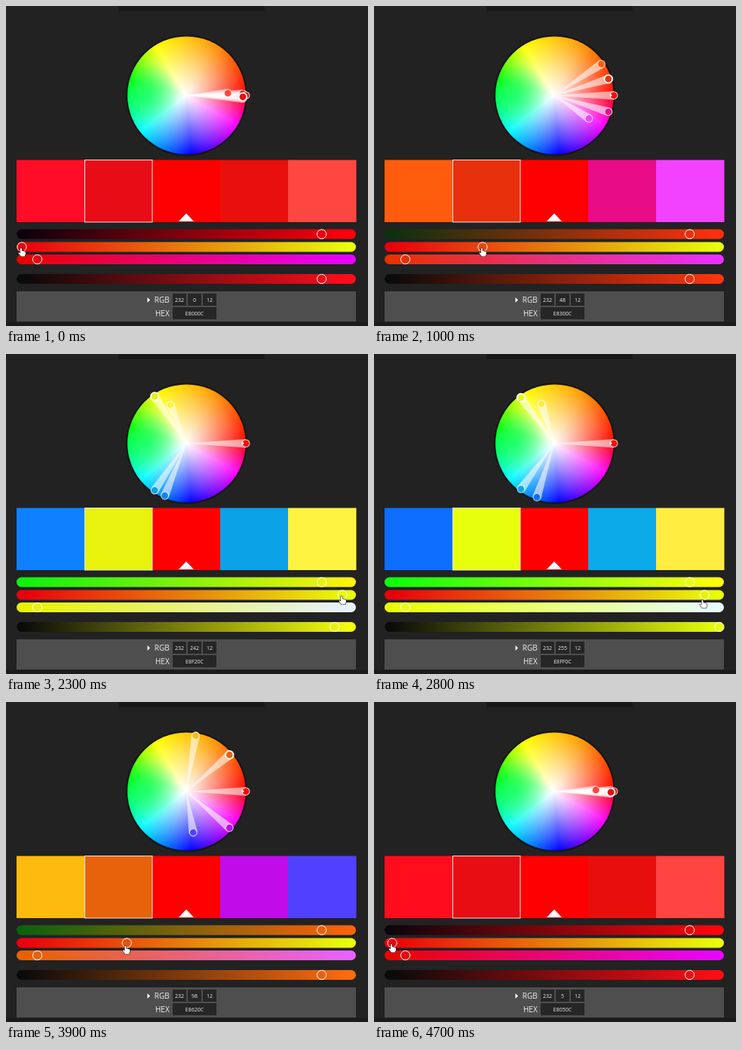
Recreate the animation shown at these times as an HTML page with a canvas. Size 480x425 px, loop 4800 ms.

```html
<!DOCTYPE html>
<html>
<head>
<meta charset="utf-8">
<style>
html, body { margin: 0; width: 100%; height: 100%; overflow: hidden; background: #222; }
canvas { display: block; }
</style>
</head>
<body>
<canvas id="stage" width="480" height="425"></canvas>
<script>
const ctx = document.getElementById('stage').getContext('2d');
const LOOP = 4800, STEP = 100;
const CX = 239, CY = 118.7, R = 79;

const clamp = x => Math.max(0, Math.min(1, x));
const mod = a => (a % 360 + 360) % 360;

// Both sweep 0..1 and back; the knob runs ahead of the shown value.
const ramp = (elapsed, span, power) => clamp(elapsed / span) ** power;
const valueAt = t => Math.min(ramp(t - 110, 2254.7, 1.796), ramp(4819 - t, 1775, 1.455));
const knobAt = t => Math.min(ramp(t - 540, 1814, .924), ramp(4748 - t, 2017, 1.32));

// hue in degrees, angle on the artist's wheel
const WHEEL = [[0, 0], [35, 60], [60, 122], [120, 165], [180, 218], [240, 275], [300, 330], [360, 360]];

function lookup(x, from, to) {
  const i = Math.max(1, WHEEL.findIndex(p => p[from] >= x));
  const a = WHEEL[i - 1], b = WHEEL[i];
  return a[to] + (b[to] - a[to]) * (x - a[from]) / (b[from] - a[from]);
}
const hueToAngle = h => lookup(mod(h), 0, 1);
const angleToHue = a => lookup(mod(a), 1, 0);
const rgb = (...c) => `rgb(${c.map(Math.round).join()})`;

function hsv(h, s, v) {
  const channel = n => {
    const k = (n + h / 60) % 6;
    return 255 * v * (1 - s * clamp(Math.min(k, 4 - k)));
  };
  return rgb(channel(5), channel(3), channel(1));
}

function rgbToHue(r, g, b) {
  if (g < b) return 60 * (g - b) / (r - g);
  return r >= g ? 60 * (g - b) / (r - b) : 120 + 60 * (b - r) / (g - b);
}

function rect(x, y, w, h, color) {
  ctx.fillStyle = color;
  ctx.fillRect(x, y, w, h);
}

function poly(points, color) {
  ctx.beginPath();
  points.forEach(p => ctx.lineTo(...p));
  ctx.closePath();
  ctx.fillStyle = color;
  ctx.fill();
}

function circle(x, y, r, fill, stroke, width) {
  ctx.beginPath();
  ctx.arc(x, y, r, 0, 7);
  if (fill) { ctx.fillStyle = fill; ctx.fill(); }
  if (stroke) { ctx.strokeStyle = stroke; ctx.lineWidth = width; ctx.stroke(); }
}

function text(str, x, y, size, align = 'center') {
  ctx.font = `${size}px "Open Sans", "Noto Sans", sans-serif`;
  ctx.textAlign = align;
  ctx.fillStyle = '#eee';
  ctx.fillText(str, x, y);
}

function radial(x, y, r, inner, outer) {
  const g = ctx.createRadialGradient(x, y, 0, x, y, r);
  g.addColorStop(0, inner);
  g.addColorStop(1, outer);
  return g;
}

const disc = ctx.createConicGradient(0, CX, CY);
WHEEL.forEach(([h, a]) => disc.addColorStop(1 - a / 360, hsv(h % 360, 1, 1)));
const glow = radial(CX, CY, R, '#fff', 'rgba(255,255,255,0)');
const greenSide = radial(CX - 52, CY, 42, 'rgba(0,255,90,.65)', 'rgba(0,255,90,0)');

function drawWheel(markers) {
  circle(CX + .4, CY, R + 1.5, '#151515');
  for (const layer of [disc, glow, greenSide]) circle(CX + .4, CY, R - .7, layer);
  for (const m of markers) {
    const t = m.angle * Math.PI / 180;
    m.x = CX + Math.cos(t) * m.radius * R;
    m.y = CY - Math.sin(t) * m.radius * R;
    const dx = 5.8 * Math.sin(t), dy = 5.8 * Math.cos(t);
    poly([[CX, CY], [m.x + dx, m.y + dy], [m.x - dx, m.y - dy]], 'rgba(255,255,255,.58)');
  }
  // the selected marker goes on top
  for (const i of [4, 3, 0, 2, 1]) {
    const m = markers[i];
    if (i === 1) circle(m.x, m.y, 5.3, m.color, '#fff', 1.8);
    else circle(m.x, m.y, 4.9, m.color, 'rgba(255,255,255,.7)', 1.2);
    if (i === 2) poly([[m.x - 5, m.y - 2.5], [m.x - 2, m.y], [m.x - 5, m.y + 2.5]], '#fff');
  }
}

function drawSwatches(markers) {
  markers.forEach((m, i) => rect(14 + 90 * i, 204.5, 90.5, 82.5, m.color));
  ctx.strokeStyle = '#e4e4e4';
  ctx.lineWidth = 1;
  ctx.strokeRect(104.5, 204.5, 89.5, 82.5);
  poly([[229, 286], [239, 275.5], [249, 286]], '#fff');
}

function slider(y, from, to, knob) {
  const fill = ctx.createLinearGradient(21, 0, 458, 0);
  fill.addColorStop(0, from);
  fill.addColorStop(1, to);
  ctx.beginPath();
  ctx.roundRect(14, y - 6.5, 450, 13, 6.5);
  ctx.fillStyle = fill;
  ctx.fill();
  circle(knob, y, 6.1, null, '#fff', 1);
}

function drawPanel(r, g, b) {
  rect(14, 379, 450, 40, '#4e4e4e');
  rect(0, 420, 480, 5, '#1b1b1b');
  poly([[187.5, 387], [191, 390.5], [187.5, 394]], '#fff');
  text('RGB', 216.7, 394, 10, 'right');
  text('HEX', 216.7, 412, 10, 'right');
  [r, g, b].forEach((v, i) => {
    rect(221 + 20 * i, 382, 18, 16, '#262626');
    text(v, 230 + 20 * i, 393, 7);
  });
  rect(221, 400, 58, 16, '#262626');
  const hex = [r, g, b].map(v => v.toString(16).padStart(2, '0')).join('').toUpperCase();
  text(hex, 250, 411, 7);
}

const HAND = new Path2D('M-1 .5Q0-.6 1 .5V4.2Q2.2 3.4 3 4.6Q4.2 4 4.8 5.2Q6.4 4.8 6.4 6.5V8.5L5.2 12H-.2L-3.6 7.6Q-3.6 6-2.2 6.4L-1 7.4Z');
const ARROW = new Path2D('M0 0V10L2.3 8L4 11.5L5.6 10.7L4 7.4H7Z');

// On the way back the pointer dips below the track and briefly lets go.
function drawCursor(time, knob) {
  const dip = Math.sin(Math.PI * clamp((time - 2300) / 1800));
  const arrow = dip > .95;
  const shape = arrow ? ARROW : HAND;
  ctx.save();
  ctx.translate(knob - 1 - 2.5 * dip, 321.5 + 6.5 * dip);
  ctx.scale(.92, .92);
  ctx.lineWidth = 1.2;
  ctx.lineJoin = 'round';
  ctx.strokeStyle = arrow ? '#ddd' : '#111';
  ctx.fillStyle = arrow ? '#000' : '#fff';
  ctx.stroke(shape);
  ctx.fill(shape);
  ctx.restore();
}

function draw(time) {
  const r = 232, g = Math.round(255 * valueAt(time)), b = 12;
  const value = Math.max(r, g) / 255, sat = 1 - b / (value * 255);
  const hue = rgbToHue(r, g, b);
  const angle = hueToAngle(hue);
  const knobX = level => 21 + 437 * level;
  const knob = knobX(knobAt(time));

  const marker = (turn, radius, s, v) => ({
    angle: turn * angle, radius, color: hsv(angleToHue(turn * angle), s, v)
  });
  const markers = [
    marker(2, .95, .95, 1),
    marker(1, .95, sat, value),
    marker(0, 1, 1, 1),
    marker(-1, .95, .95, r / 255),
    marker(-2, .7, .745, 1)
  ];

  rect(0, 0, 480, 425, '#222');
  rect(149, 0, 194, 7, '#191919');
  drawWheel(markers);
  drawSwatches(markers);
  slider(303, rgb(b, g, b), rgb(255, g, b), knobX(r / 255));
  slider(320, rgb(r, 0, b), rgb(r, 255, b), knob);
  slider(336.5, rgb(r, g, 0), rgb(r, g, 255), knobX(b / 255));
  slider(362.5, '#0a0a0a', hsv(mod(hue), sat, 1), knobX(value));
  drawPanel(r, g, b);
  drawCursor(time, knob);
}

function tick() {
  draw(Math.floor(performance.now() % LOOP / STEP) * STEP);
  requestAnimationFrame(tick);
}
tick();
</script>
</body>
</html>
```
